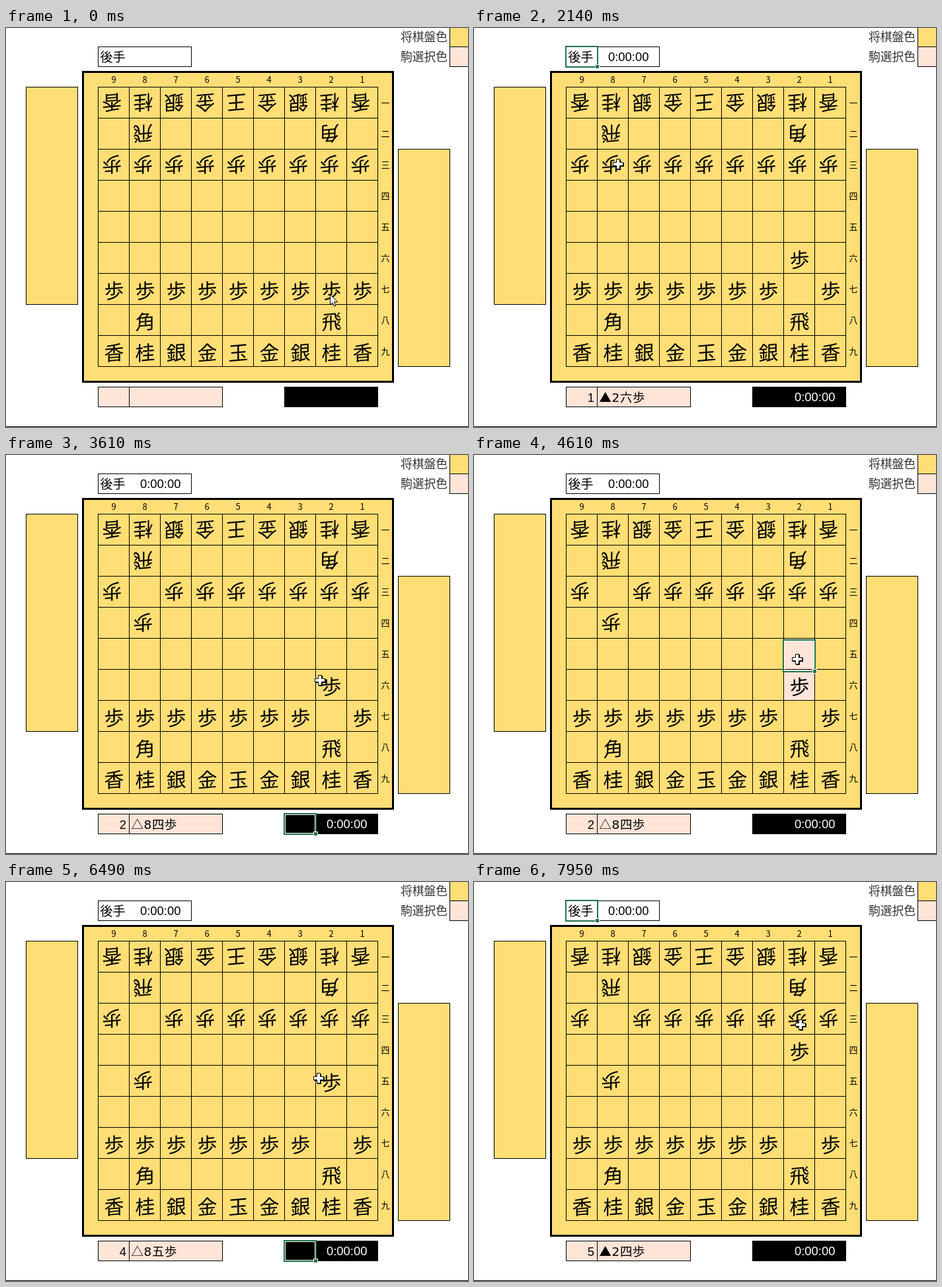
Recreate the animation shown at these times as an HTML page. Size 699x604 px, loop 8 s.

```html
<!DOCTYPE html>
<html lang="ja">
<head>
<meta charset="utf-8">
<title>将棋盤</title>
<style>
  html, body { margin: 0; width: 100%; height: 100%; overflow: hidden; background: #fff; }
  svg { display: block; width: 699px; height: 604px; }
  text { font-family: "Noto Sans CJK JP", "Noto Sans CJK", sans-serif; fill: #000; }
  .piece { font-size: 30px; font-weight: 500; text-anchor: middle; }
  .label { font-size: 13px; text-anchor: middle; }
  .entry { font-size: 18.4px; }
  .digits { font: 18.4px "Liberation Sans", sans-serif; }
  .wide { font-family: "DejaVu Sans", sans-serif; }
  .legend { font-size: 17.8px; font-weight: 300; fill: #333; }
</style>
</head>
<body>
<svg id="stage" viewBox="0 0 699 604"></svg>
<script>
const WOOD = '#ffde75', PINK = '#ffe4d8', GREEN = '#217346';
const LEFT = 139, TOP = 89, CELL = 47, LOOP = 8000;
const KANJI = '一二三四五六七八九';
const stage = document.getElementById('stage');

const set = (node, attrs) => { for (const key in attrs) node.setAttribute(key, attrs[key]); };
function add(tag, attrs, text, parent = stage) {
  const node = document.createElementNS('http://www.w3.org/2000/svg', tag);
  set(node, attrs);
  if (text) node.textContent = text;
  parent.append(node);
  return node;
}
const fillRect = (x, y, width, height, fill) => add('rect', { x, y, width, height, fill });
const box = (x1, y1, x2, y2, fill) => add('rect', {
  x: x1 + .5, y: y1 + .5, width: x2 - x1, height: y2 - y1, fill, stroke: '#000'
});
const write = (x, y, text, cls, extra = {}) => add('text', { x, y, class: cls, ...extra }, text);
const show = (node, on) => node.setAttribute('visibility', on ? 'visible' : 'hidden');
const cellX = file => LEFT + (9 - file) * CELL;
const cellY = rank => TOP + (rank - 1) * CELL;

// Sheet around the board
write(597, 19.5, '将棋盤色', 'legend');
write(597, 49.5, '駒選択色', 'legend');
box(671, -2, 702, 28, WOOD);
box(671, 28, 702, 58, PINK);
box(30, 89, 108, 418, WOOD);
box(593, 183, 671, 512, WOOD);
box(139, 28, 280, 58, '#fff');
box(139, 543, 186, 573, PINK);
box(186, 543, 327, 573, PINK);
fillRect(421, 543, 142, 31, '#000');
fillRect(0, 603, 699, 1, '#000');
write(142.5, 51, '後手', 'entry', { style: 'font-size:19px' });
const clocks = [
  write(203, 50, '0:00:00', 'digits'),
  write(485, 565, '0:00:00', 'digits', { style: 'fill:#fff' })
];
const moveNumber = write(182, 566, '', 'digits', { 'text-anchor': 'end' });
const moveText = write(189.5, 565.5, '', 'entry', { 'letter-spacing': '.7' });
const [moveSide, moveFile, moveRank] =
  ['', 'wide', ''].map(cls => add('tspan', { class: cls }, '', moveText));

// Board
add('rect', { x: 116.5, y: 66.5, width: 469, height: 469, fill: WOOD, stroke: '#000', 'stroke-width': 3 });
const marks = [0, 1].map(() => fillRect(0, 0, CELL, CELL, PINK));
for (let i = 0; i < 10; i++) {
  fillRect(LEFT + i * CELL, TOP, 1, 9 * CELL + 1, '#000');
  fillRect(LEFT, TOP + i * CELL, 9 * CELL + 1, 1, '#000');
}
for (let i = 1; i <= 9; i++) {
  write(cellX(i) + 24, 83, i, 'label');
  write(574, cellY(i) + 29, KANJI[i - 1], 'label');
}

// Pieces
const pieces = [];
function addPiece(char, file, rank, flipped) {
  const node = add('text', { class: 'piece', y: 11 }, char);
  pieces.push({ node, file, rank, flipped });
}
for (let file = 1; file <= 9; file++) {
  const back = '香桂銀金玉金銀桂香'[file - 1];
  addPiece(file === 5 ? '王' : back, file, 1, true);
  addPiece('歩', file, 3, true);
  addPiece('歩', file, 7, false);
  addPiece(back, file, 9, false);
}
addPiece('角', 2, 2, true);
addPiece('飛', 8, 2, true);
addPiece('角', 8, 8, false);
addPiece('飛', 2, 8, false);

const moves = ['2726', '8384', '2625', '8485', '2524'];
function placePiece(piece, count) {
  let { file, rank, flipped } = piece;
  for (const move of moves.slice(0, count)) {
    const [f1, r1, f2, r2] = [...move].map(Number);
    if (file === f1 && rank === r1) [file, rank] = [f2, r2];
  }
  const x = cellX(file) + (flipped ? 21.3 : 24.5), y = cellY(rank) + (flipped ? 23.5 : 26.8);
  piece.node.setAttribute('transform',
    `translate(${x} ${y}) rotate(${flipped ? 180 : 0}) skewY(-5)`);
}

// Selection frame with its white inner line and fill handle
const inner = add('rect', { fill: 'none', stroke: '#fff' });
const frame = add('rect', { fill: 'none', stroke: GREEN, 'stroke-width': 2 });
const handle = add('rect', { width: 6, height: 6, fill: GREEN, stroke: '#fff' });
function select(target) {
  for (const part of [inner, frame, handle]) show(part, target);
  if (!target) return;
  let x, y, w = CELL, h = 30;
  if (target === 'gote') [x, y] = [139, 28];
  else if (target === 'sente') [x, y] = [421, 543];
  else [x, y, h] = [cellX(+target[0]), cellY(+target[1]) + 3, CELL];
  set(frame, { x, y, width: w + 1, height: h + 1 });
  set(inner, { x: x + 1.5, y: y + 1.5, width: w - 2, height: h - 2 });
  set(handle, { x: x + w - 2.5, y: y + h - 2.5 });
}

// Pointers
const arrow = add('path', {
  d: 'M490.5 403.5v15.5l3.6-3.4 2.6 5.6 2.4-1.1-2.5-5.4h4.9z', fill: '#fff', stroke: '#000'
});
const cross = add('g', {});
const plus = 'M-3-7.5h5v5h5v5h-5v5h-5v-5h-5v-5h5z';
add('path', { d: plus, fill: '#000', stroke: '#000', transform: 'translate(1.5 1)' }, '', cross);
add('path', { d: plus, fill: '#fff', stroke: '#000', transform: 'translate(.5 0)' }, '', cross);

// time, selected cell, marked cells, moves played
const steps = [
  [0, '', '', 0],
  [820, '27', '27', 0], [880, 'sente', '27', 0],
  [1340, '26', '27 26', 0], [1400, 'sente', '27 26', 0], [1460, 'gote', '', 1],
  [2260, '83', '83', 1], [2330, 'gote', '83', 1],
  [3110, '84', '83 84', 1], [3170, 'gote', '83 84', 1], [3300, 'sente', '', 2],
  [3980, '26', '26', 2], [4040, 'sente', '26', 2],
  [4580, '25', '26 25', 2], [4680, 'sente', '26 25', 2], [4725, 'gote', '', 3],
  [5330, '84', '84', 3], [5390, 'gote', '84', 3],
  [5680, '85', '84 85', 3], [5740, 'gote', '84 85', 3], [5870, 'sente', '', 4],
  [6620, '25', '25', 4], [6680, 'sente', '25', 4],
  [7150, '24', '25 24', 4], [7230, 'sente', '25 24', 4], [7350, 'gote', '', 5]
];

// time, x, y
const path = [
  [320, 497, 412], [640, 494, 403], [900, 494, 401], [1250, 490, 352], [1440, 490, 352],
  [1580, 429, 306], [1640, 429, 306], [2140, 218, 206], [2250, 218, 206], [2440, 218, 213],
  [2490, 218, 214], [2860, 214, 250], [3300, 214, 250], [3610, 475, 341], [3690, 475, 341],
  [3800, 490, 351], [4050, 490, 351], [4500, 489, 309], [4680, 489, 309], [4730, 416, 314],
  [4800, 416, 314], [5300, 212, 254], [5600, 212, 254], [5700, 212, 293], [5890, 212, 293],
  [6380, 463, 298], [6490, 473, 297], [6560, 473, 297], [6640, 492, 300], [6720, 492, 300],
  [7100, 492, 258], [7400, 492, 258], [7950, 494, 216]
];

function crossAt(t) {
  const next = path.findIndex(p => p[0] > t);
  if (next < 0) return path.at(-1).slice(1);
  if (next === 0) return path[0].slice(1);
  const [t0, x0, y0] = path[next - 1], [t1, x1, y1] = path[next];
  const u = (t - t0) / (t1 - t0), k = u * u * (3 - 2 * u);
  return [x0 + (x1 - x0) * k, y0 + (y1 - y0) * k].map(Math.round);
}

let current;
function apply(step) {
  if (step === current) return;
  current = step;
  const [, target, marked, count] = step;
  const cells = marked.split(' ');
  marks.forEach((mark, i) => {
    const cell = cells[i];
    show(mark, cell);
    if (cell) set(mark, { x: cellX(+cell[0]), y: cellY(+cell[1]) });
  });
  pieces.forEach(piece => placePiece(piece, count));
  select(target);
  clocks.forEach(clock => show(clock, count));
  show(moveText, count);
  moveNumber.textContent = count || '';
  if (!count) return;
  const [, , file, rank] = moves[count - 1];
  moveSide.textContent = count % 2 ? '▲' : '△';
  moveFile.textContent = file;
  moveRank.textContent = KANJI[rank - 1] + '歩';
}

function render(now) {
  const t = now % LOOP;
  apply(steps.findLast(step => step[0] <= t));
  show(arrow, t < 320);
  show(cross, t >= 320);
  cross.setAttribute('transform', `translate(${crossAt(t).join(' ')})`);
}

const start = performance.now();
function tick() {
  render(performance.now() - start);
  requestAnimationFrame(tick);
}
tick();
</script>
</body>
</html>
```
